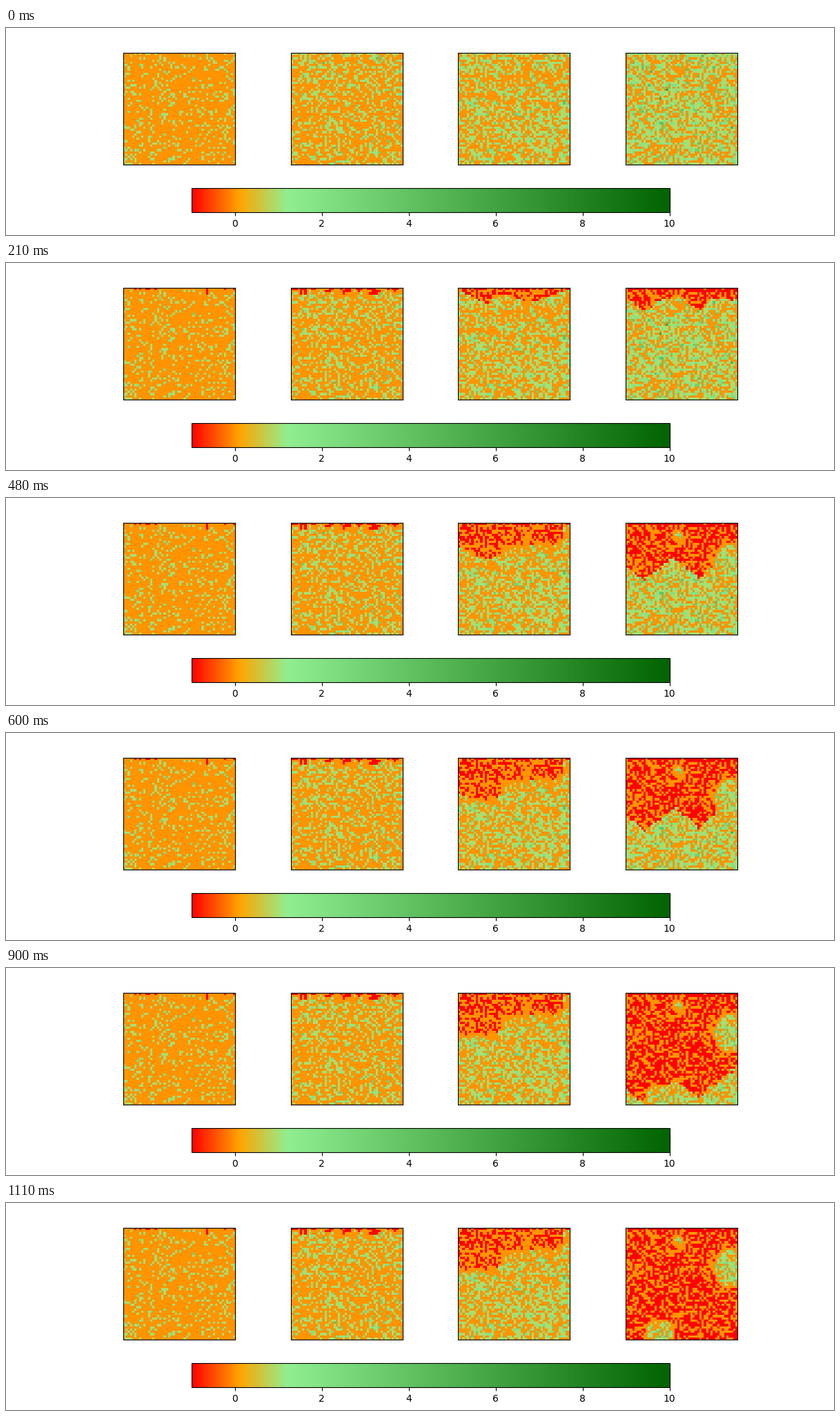
These frames come from a looping animation (1200 px wide and 300 px high, 1140 ms). A matplotlib script:

```python
import numpy as np
import matplotlib.pyplot as plt
from matplotlib.animation import FuncAnimation
from matplotlib.colors import LinearSegmentedColormap

N = 50
FRAMES = 38
ROWS, COLS = np.mgrid[:N, :N]


def plant(rng, density, top_share):
    """Random tree counts per cell, with a denser first row."""
    trees = rng.poisson(density, (N, N)).astype(float)
    trees[0] = np.maximum(trees[0], rng.random(N) < top_share)
    return trees


def creep(trees, max_depth):
    """Ignition times of a fire passing from tree to adjacent tree."""
    start = np.full((N, N), np.inf)
    start[0, trees[0] > 0] = 1
    for step in range(2, FRAMES):
        lit = np.pad(start < step, 1)
        near = lit[:-2, 1:-1] | lit[2:, 1:-1] | lit[1:-1, :-2] | lit[1:-1, 2:]
        fresh = near & (trees > 0) & np.isinf(start) & (ROWS < max_depth)
        start[fresh] = step
    return start


def sweep(rng, lobes):
    """Ignition times of wedge-shaped fronts (column, speed, slope)."""
    times = [1 + (ROWS + slope * abs(COLS - col)) / speed
             for col, speed, slope in lobes]
    start = np.min(times, axis=0) + rng.uniform(-0.5, 0.5, (N, N))
    start[0] = 1
    return np.clip(start, 1, FRAMES - 1)


def spare(trees, start, gap):
    """Keep cells with gap > 1 unburnt, behind a mostly bare strip."""
    start[gap > 0] = np.inf
    trees[(gap > 0) & (gap < 1.2)] = 0


rng = np.random.default_rng(21)
forests = [plant(rng, density, share) for density, share in
           [(0.18, 0), (0.38, 0.35), (0.58, 0.4), (0.82, 0.7)]]
starts = [
    creep(forests[0], 3),
    creep(forests[1], 3),
    sweep(rng, [(12, 1.1, 0.5), (32, 1.0, 0.3)]),
    sweep(rng, [(8, 1.7, 0.8), (32, 1.6, 0.8), (25, 0.8, 0)]),
]

# the third fire dies along a falling line
rest = np.interp(COLS, [0, 17, 21, 46, 47], [18, 17.5, 10, 8, 0])
spare(forests[2], starts[2], ROWS - rest + rng.uniform(-1, 1, (N, N)))

# the fourth one leaves a few islands: column, row, radii
for col, row, rx, ry in [(23, 5.5, 3, 3), (46, 17.5, 7.5, 9.5),
                         (15, 46, 7, 6)]:
    inside = 1 - np.hypot((COLS - col) / rx, (ROWS - row) / ry)
    spare(forests[3], starts[3], inside * min(rx, ry))

cmap = LinearSegmentedColormap.from_list(
    "forest", [(0, "red"), (0.1, "orange"), (0.2, "lightgreen"),
               (1, "darkgreen")])

fig, axes = plt.subplots(1, 4, figsize=(12, 3), dpi=100)
images = []
for ax, trees in zip(axes, forests):
    images.append(ax.imshow(trees, cmap=cmap, vmin=-1, vmax=10))
    ax.set_xticks([])
    ax.set_yticks([])
fig.colorbar(images[0], ax=list(axes), orientation="horizontal")


def update(frame):
    for im, trees, start in zip(images, forests, starts):
        im.set_data(np.where((trees > 0) & (start <= frame), -1, trees))
    return images


anim = FuncAnimation(fig, update, frames=FRAMES, interval=30, repeat=True,
                     repeat_delay=0, blit=False)
plt.show()
```
